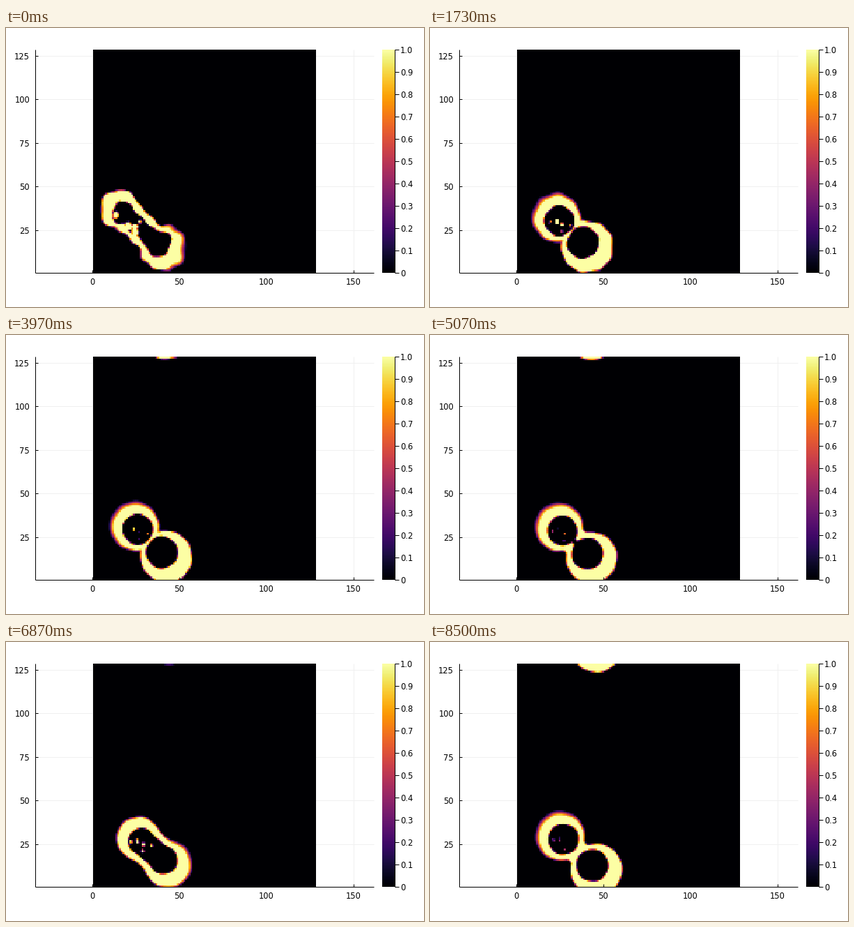
Recreate the animation shown at these times as a matplotlib script. Size 600x400 px, loop 8.53 s.

```python
import numpy as np
import matplotlib.pyplot as plt
from matplotlib.animation import FuncAnimation

LOOP, FRAMES, N = 8530, 256, 128
LEFT, RIGHT, TOP, BOTTOM = 125, 445, 31, 351
CELL = 2.5

# Cell centres in stage pixels; the upper rows wrap round below the floor.
rows = np.arange(N)
rows = np.where(rows > 96, rows - N, rows)
X, Y = np.meshgrid(LEFT + CELL * (np.arange(N) + .5), BOTTOM - CELL * (rows + .5))
HEADING = np.arctan2(300 - Y, X - 210)

rng = np.random.default_rng(4)
SPECKS = rng.normal(0, 9, (7, 2))
SPREAD = rng.uniform(0, .6, 7)


def vec(x, y):
    return np.array([x, y], float)


def disc(c, r):
    return np.hypot(X - c[0], Y - c[1]) - r


def bar(a, b, r):
    """Distance to a round-ended bar from a to b."""
    e = b - a
    t = np.clip(((X - a[0]) * e[0] + (Y - a[1]) * e[1]) / (e @ e), 0, 1)
    return np.hypot(X - a[0] - t * e[0], Y - a[1] - t * e[1]) - r


def bulbs(a, ra, b, rb, neck, k=1.2):
    """Two discs joined by a neck, blended smoothly."""
    parts = [disc(a, ra), disc(b, rb), bar(a, b, neck)]
    return -k * np.log(sum(np.exp(-d / k) for d in parts))


def toward(degrees):
    return np.clip(np.cos(HEADING - np.radians(degrees)), 0, 1) ** 2


def field(ms):
    """The creature pulses between one long cell and two open rings."""
    u = .45 + 22.55 * ms / 8500
    p, age = u % 1, u / 10
    wide = np.cos(np.pi * p) ** 2
    young = np.exp(-u / 2)

    def mix(tight, broad, w=wide):
        return tight + (broad - tight) * w

    a = mix(vec(182, 264) + age * vec(5, 10), vec(183, 271) + age * vec(2.2, 3.3))
    a = a - young * vec(23, 6)
    b = mix(vec(224, 315) + age * vec(4, 1), vec(222.5, 309.5) + age * vec(7.2, 7.2))
    body = bulbs(a, mix(30, 34) - 3 * young, b, mix(32, 37),
                 mix(27, 17, wide ** 3) - 5 * young)

    ha, hb = a + 4, b - 6
    hole = bulbs(ha, mix(17, 22) - 2 * young, hb, mix(19, 23),
                 mix(18, -8, wide ** 4) - 6 * young)

    rough = (.5 + 2.5 * np.exp(-u / 5)) * np.sin(X / 5 + 3 * u) * np.sin(Y / 6 - 2 * u)
    size = 4.5 * max(np.cos(np.pi * (p - .4)) ** 2, np.exp(-u / 6))
    for offset, spread in zip(SPECKS, SPREAD):
        hole = np.maximum(hole, -disc(ha + offset + young * spread * (hb - ha), size))

    soft = 2.5 + 6 * wide * toward(135) + 5 * (1 - wide) * toward(-10)
    return (np.clip(.5 - (body + rough) / soft, 0, 1)
            * np.clip(.5 + (hole - rough) / 2, 0, 1))


fig = plt.figure(figsize=(6, 4), dpi=100, facecolor="white")
ax = fig.add_axes([0, 0, 1, 1])
ax.axis("off")
FONT = dict(family="DejaVu Sans", size=8.3, color="black")


def line(x0, y0, x1, y1, color="black", lw=.72, z=3):
    ax.plot([x0, x1], [y0, y1], color=color, lw=lw, zorder=z, solid_capstyle="butt")


def label(x, y, text, ha):
    ax.text(x, y - .5, text, ha=ha, va="center_baseline", **FONT)


def picture(data, x0, x1, z):
    e = .01  # keeps the edges inside whole pixels
    return ax.imshow(data, cmap="inferno", vmin=0, vmax=1, origin="lower",
                     extent=(x0 + e, x1 - e, BOTTOM - e, TOP + e),
                     interpolation="nearest", aspect="auto", zorder=z)


for v in range(0, 151, 50):
    x = LEFT + CELL * (v - .5)
    line(x, TOP, x, BOTTOM, "#f0f0f0", z=0)
    line(x, BOTTOM, x, BOTTOM - 4)
    label(x, 363.3, str(v), "center")
for v in range(25, 126, 25):
    y = BOTTOM - CELL * (v - .5)
    line(42, y, 528, y, "#f0f0f0", z=0)
    line(42, y, 46, y)
    label(34.2, y + .5, str(v), "right")
line(42, BOTTOM, 528, BOTTOM)
line(42, TOP, 42, BOTTOM)

picture(np.linspace(0, 1, 256)[:, None], 540, 558, 1)
line(558, TOP, 558, BOTTOM)
for i in range(11):
    y = BOTTOM - 32 * i
    line(558, y, 564, y)
    label(565.8, y + .5, f"{i / 10:.1f}" if i else "0", "left")

image = picture(field(0), LEFT, RIGHT, 2)
ax.set_xlim(0, 600)
ax.set_ylim(400, 0)


def update(i):
    image.set_data(field(i * LOOP / FRAMES))
    return [image]


anim = FuncAnimation(fig, update, frames=FRAMES, interval=LOOP / FRAMES,
                     repeat=True, repeat_delay=0)
plt.show()
```
